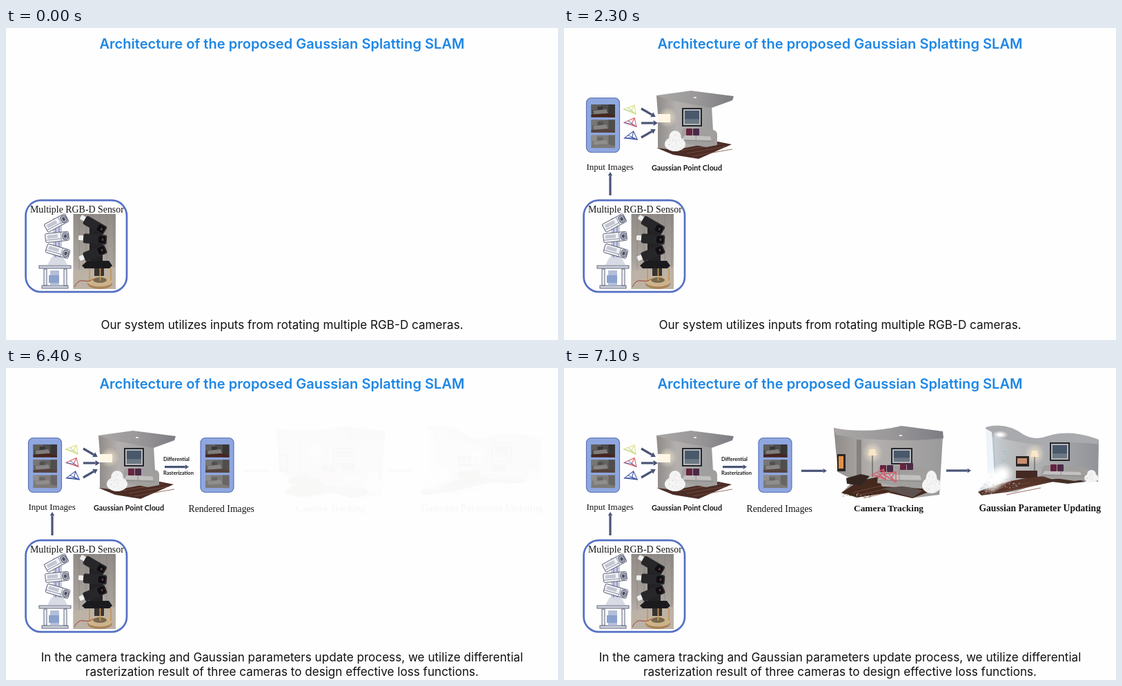
Animation, 800 px wide and 453 px high, one loop 8 s. Source, as an HTML page:

```html
<!DOCTYPE html>
<html lang="en">
<head>
<meta charset="utf-8">
<title>Gaussian Splatting SLAM architecture</title>
<style>
html, body { margin: 0; width: 100%; height: 100%; overflow: hidden; background: #fefefe; }
svg { display: block; width: 100%; height: 100%; }
.sans { font-family: Inter, sans-serif; text-anchor: middle; }
.serif { font-family: "Liberation Serif", serif; fill: #161616; }
.bold { font-weight: 700; }
.label { font-family: Lato, sans-serif; font-weight: 700; fill: #161616; }
.arrow { stroke: #4a5476; fill: #4a5476; }
</style>
</head>
<body>
<svg viewBox="0 0 800 453">
  <defs>
    <linearGradient id="wall">
      <stop offset="0" stop-color="#8f8b89"/><stop offset=".35" stop-color="#b3b0ae"/><stop offset="1" stop-color="#9b9a9b"/>
    </linearGradient>
    <linearGradient id="ceiling">
      <stop offset="0" stop-color="#aaa7a6"/><stop offset=".5" stop-color="#9b999a"/><stop offset="1" stop-color="#7d7c82"/>
    </linearGradient>
    <linearGradient id="pale">
      <stop offset="0" stop-color="#d3dfea"/><stop offset=".25" stop-color="#bdbebf"/><stop offset="1" stop-color="#929398"/>
    </linearGradient>
    <linearGradient id="boards" x2="0" y2="1">
      <stop offset="0" stop-color="#918b87"/><stop offset=".6" stop-color="#a8a19b"/><stop offset="1" stop-color="#cbc1b7"/>
    </linearGradient>
    <radialGradient id="glow"><stop offset=".2" stop-color="#fff"/><stop offset="1" stop-color="#fff" stop-opacity="0"/></radialGradient>
    <radialGradient id="warm"><stop offset="0" stop-color="#fff0d2" stop-opacity=".8"/><stop offset="1" stop-color="#fff0d2" stop-opacity="0"/></radialGradient>
  </defs>
  <rect width="800" height="453" fill="#fefefe"/>
  <text class="sans" x="400" y="29.5" font-size="20.1" font-weight="600" fill="#1e87e5">Architecture of the proposed Gaussian Splatting SLAM</text>
  <g id="sensor"></g>
  <g id="input"></g>
  <g id="cloud"></g>
  <g id="render"></g>
  <g id="update"></g>
  <g class="sans" font-size="17.13" fill="#111">
    <text id="before" x="400" y="437">Our system utilizes inputs from rotating multiple RGB-D cameras.</text>
    <g id="after">
      <text x="400" y="426">In the camera tracking and Gaussian parameters update process, we utilize differential</text>
      <text x="400" y="447">rasterization result of three cameras to design effective loss functions.</text>
    </g>
  </g>
</svg>
<script>
const el = id => document.getElementById(id);
const rect = (x, y, w, h, fill, extra = '') => `<rect x="${x}" y="${y}" width="${w}" height="${h}" fill="${fill}" ${extra}/>`;
const oval = (x, y, rx, ry, fill) => `<ellipse cx="${x}" cy="${y}" rx="${rx}" ry="${ry}" fill="${fill}"/>`;
const shape = (d, fill) => `<path d="${d}Z" fill="${fill}"/>`;
const line = (d, stroke, width = 1) => `<path d="${d}" fill="none" stroke="${stroke}" stroke-width="${width}"/>`;
const text = (x, y, size, words, cls = 'serif') => `<text class="${cls}" x="${x}" y="${y}" font-size="${size}">${words}</text>`;
const at = (x, y, art, turn = 0, scale = 1) => `<g transform="translate(${x} ${y}) rotate(${turn}) scale(${scale})">${art}</g>`;
const repeat = (n, make) => Array.from({ length: n }, (_, i) => make(i)).join('');

function arrow(x, y, length, turn = 0, head = 3.3) {
  const neck = length - head * 1.6;
  return at(x, y, `<g class="arrow"><path d="M0 0H${neck}" stroke-width="3.2"/>
    <path d="M${neck} ${-head}L${length} 0L${neck} ${head}Z" stroke="none"/></g>`, turn);
}

function random(seed) {
  return () => (seed = seed * 16807 % 2147483647) / 2147483647;
}

// Loose points scattered over an ellipse
function specks(x, y, rx, ry, count, ...colors) {
  const next = random(Math.round(x * 31 + y * 7));
  return repeat(count, i => {
    const a = next() * Math.PI * 2, r = Math.sqrt(next());
    return rect((x + Math.cos(a) * r * rx).toFixed(1), (y + Math.sin(a) * r * ry).toFixed(1), 1, 1, colors[i % colors.length]);
  });
}

// Sensor box
const INK = 'stroke="#565a70" stroke-width=".9"';

const sketchLens = rect(-17, -6.5, 34, 13, '#f1f2f6', `rx="2" ${INK}`) + rect(-14, -4, 15, 5, '#c3c6d2')
  + line('M-17 3H6M6 -6V6', '#7b7e92', .8) + rect(8, -5, 8, 10, '#a9acba', `rx="3" ${INK}`) + oval(12, 0, 2, 2.6, '#4a4d60');

const photoLens = rect(-23, -4, 9, 7, '#eeeeec', 'rx="1.5"') + rect(-16, -7, 34, 14, '#27272a', 'rx="3"')
  + rect(6, -5, 10, 10, '#0f0f12', 'rx="2"') + oval(12, 0, 1.5, 2, '#63363c');

const sketch = rect(68, 276, 13, 68, '#c9cce0') + line('M72 276V344M77 276V344', '#7c80b8', 1.2)
  + repeat(3, i => at(73 + i, 283 + 20.5 * i, sketchLens, 22 * i - 28))
  + shape('M60 344L66 333H83L89 344', '#d8dae4')
  + repeat(2, i => rect(48 + 4 * i, 345 + 29 * i, 46 - 8 * i, 4, '#cfd2dd', INK) + rect(55 + 29 * i, 350, 4, 24, '#eceef3', INK))
  + rect(64, 352, 13, 22, '#b4bfd8') + rect(62, 359, 15, 11, '#8ba2cd');

const photo = rect(97.5, 270, 61.5, 109, 'url(#boards)')
  + repeat(6, i => line(`M${106 + i * 10} 270V350`, '#857e7a', .6))
  + shape('M97.5 353L159 347V379H97.5', '#bdb2a6') + rect(121, 287, 19, 56, '#222225')
  + repeat(3, i => at(128, 286 + 20.5 * i, photoLens, 30 - 26 * i))
  + shape('M110 345L118 338H149L154 345L150 349H114', '#1b1b1e') + rect(128, 349, 14, 11, '#39322d')
  + oval(136, 371, 18, 8, '#a98558') + oval(136, 368, 18, 7.5, '#cdb38c') + oval(136, 366, 10, 4, '#77684f')
  + repeat(3, i => line(`M${121 + i * 15.5} 349V367`, '#c19a5b', 1.8))
  + line('M99 376Q104 365 113 367T126 364', '#9b4136');

el('sensor').innerHTML = rect(28.6, 250.2, 146.4, 133, '#fefefe', 'rx="22" stroke="#5570c4" stroke-width="2.7"')
  + sketch + photo + text(35, 268, 13.9, 'Multiple RGB-D Sensor');

// Image panels: three views, each brighter than the one above
function thumb(i) {
  const grey = v => `rgb(${v},${v - 2},${v - 3})`;
  const base = 78 + 24 * i;
  return at(7.5, 10 + 22.3 * i, rect(0, 0, 34.5, 18.5, grey(base)) + rect(0, 0, 14 - 3 * i, 8, grey(base + 18))
    + rect(9, 3, 8, 5, grey(base - 20)) + shape('M3 9L22 7L24 13L4 14', grey(base + 50 - 16 * i))
    + rect(25, 0, 9.5, 18.5, grey(base - 22)) + shape('M0 15L24 13L34.5 16V18.5H0', ['#46251d', '#55433e', '#7d7a78'][i]));
}
const panel = rect(.5, .5, 48, 79, '#8fa6df', 'rx="7" stroke="#5b74b9" stroke-width="1.2"') + repeat(3, thumb);

const frustum = (color, cross) => line('M0 7L15 0L18 13ZM15 0L11 9L18 13', color, 1.1) + line('M0 7L11 9M6 4L18 13', cross);

el('input').innerHTML = at(32, 101, panel)
  + at(87, 111, frustum('#dfe07c', '#b7d6a0'), 4) + at(87, 130.5, frustum('#de5a62', '#5462b0'))
  + at(86, 153, frustum('#3d57a5', '#3d57a5'), -12)
  + text(32.5, 206, 13, 'Input Images') + arrow(67, 243, 34, -90);

// Room parts
const picture = (x, y, w, h) => at(x, y, rect(0, 0, w, h, '#26262b') + rect(2, 2, w - 4, h - 4, '#b4b8bb')
  + rect(4, 4, w - 8, h - 8, '#4a586c') + rect(4, h * .6, w - 8, h * .4 - 4, '#6c7883'));

const sofa = (x, y, w, h) => at(x, y, shape(`M2 4Q4 0 10 0L${w * .8} 2Q${w} 3 ${w} 9V${h}L${w * .7} ${h + 3}L0 ${h - 4}`, '#a19f9e')
  + shape(`M6 ${h * .43}L${w * .82} ${h * .5}L${w * .84} ${h * .72}L2 ${h * .68}`, '#c2c1bf')
  + line(`M${w * .42} 2V${h * .7}M3 ${h * .72}L${w * .9} ${h * .8}`, '#858383', .8));

const cushions = (x, y) => rect(x, y, 9, 10, '#67233f', 'rx="1"') + rect(x + 10, y, 9, 10, '#4b2948', 'rx="1"');

const lamp = (x, y, foot) => oval(x, y, 15, 16, 'url(#warm)') + line(`M${x} ${y}V${foot}`, '#514844')
  + shape(`M${x - 4} ${y - 5}h8l2 9h-12`, '#f8e6c6');

const screen = (x, y, w, h, glow) => rect(x, y, w, h, '#2c2625') + rect(x + 2, y + 3, w - 5, h - 7, glow);

const mound = (x, y, w, h) => at(x, y, oval(w * .5, h * .35, w * .3, h * .35, '#f4f4f4') + oval(w * .5, h * .65, w * .5, h * .35, '#f4f4f4')
  + specks(w / 2, h * .55, w * .45, h * .4, 40, '#c4c4c5', '#fff', '#dadada'));

const planks = (x, y, w) => repeat(3, i => line(`M${x + i * 8} ${y + i * 4}l${w} -10`, '#7b5041', .8));

el('cloud').innerHTML = shape('M134 98L186 107L214 113L217 166L160 180L136 174V137H154V125H136', 'url(#wall)')
  + shape('M133 98L184 91L246 99L244 105L214 116L160 106', 'url(#ceiling)') + oval(190, 101, 2.2, 1, '#f6f1e6')
  + oval(150, 130, 14, 15, 'url(#warm)') + rect(136, 126, 13, 10, '#fff6e6') + picture(171, 116, 29, 27)
  + shape('M134 174L160 177L223 165L243 169L195 190L158 184', '#4c2d26') + planks(170, 178, 58)
  + sofa(169, 145, 53, 25) + cushions(177, 146) + mound(146, 149, 30, 30)
  + repeat(3, i => arrow(112, 117 + 21 * i, 24, 30 - 30 * i, 4))
  + text(127, 207, 10.8, 'Gaussian Point Cloud', 'label');

el('render').innerHTML = at(281.5, 101, panel)
  + text(228, 135, 7.5, 'Differential', 'label') + text(228, 155, 7.5, 'Rasterization', 'label')
  + arrow(230, 143.6, 35) + text(264.5, 209, 13.7, 'Rendered Images');

const tracking = shape('M391 87L440 99L549 100L544 184L505 189L460 178L425 188L402 182L420 163L397 151', 'url(#wall)')
  + shape('M391 87Q440 96 489 84L549 92L550 102Q470 110 394 97', 'url(#ceiling)') + oval(488, 98, 2.5, 1, '#f6f1e6')
  + rect(424, 104, 7, 58, '#85817f') + lamp(447, 123, 158) + picture(474, 116, 31, 24) + screen(396, 125, 12, 25, '#e39048')
  + shape('M402 181L428 164L455 158L461 172L539 176L505 189L470 181L425 188', '#45291f') + planks(418, 181, 42)
  + shape('M409 160L430 154L443 157L430 171L410 168', '#352520') + shape('M461 175L494 171L520 178L505 188', '#5d524e')
  + sofa(454, 141, 76, 30) + cushions(458, 141) + cushions(487, 138) + mound(519, 149, 27, 33)
  + repeat(2, i => at(446 + 18 * i, 147, frustum('#de5963', '#c9687e'), 12 * i, 1.15))
  + specks(425, 185, 24, 4, 28, '#45291f', '#fefefe');

const updating = shape('M611 87L684 106L735 99L775 105L774 165L700 162L655 180L604 184L600 179L621 152', 'url(#pale)')
  + shape('M611 86Q640 78 665 96Q682 106 700 99Q735 88 775 104V111Q738 105 684 112Q650 106 614 98', '#a9aaad')
  + oval(632, 97, 12, 6, 'url(#glow)') + shape('M611 88L620 93L624 158L614 153', '#edf4f9') + line('M622 96L625 164', '#aebdcb', 1.3)
  + picture(704, 108, 29, 27) + lamp(682, 125, 151) + screen(655, 128, 19, 15, '#c78f72')
  + rect(655, 149, 31, 11, '#432922') + shape('M600 180Q640 162 694 157L714 164L642 180L605 185', '#573429') + planks(625, 176, 50)
  + repeat(3, i => oval(618 + 9 * i, 166 - 6 * i, 17, 17, 'url(#glow)'))
  + shape('M690 163L733 159L757 165L730 168', '#453029') + sofa(691, 141, 70, 20) + cushions(705, 140) + mound(754, 148, 21, 18)
  + specks(638, 126, 10, 10, 20, '#62b9e8', '#a5daf1') + specks(646, 167, 14, 7, 22, '#d76a62', '#70b8da', '#fff')
  + specks(613, 174, 12, 10, 36, '#fefefe', '#d9dee2', '#a99c95');

el('update').innerHTML = tracking + updating + arrow(344, 149.3, 37) + arrow(554, 149, 36)
  + text(420, 208, 13.4, 'Camera Tracking', 'serif bold') + text(601.5, 208, 13.6, 'Gaussian Parameter Updating', 'serif bold');

const LOOP = 8000, STEP = 100, FADE = 460, SWAP = 6400;
const starts = { input: 350, cloud: 1790, render: 3350, update: 6390 };

function draw(time) {
  const t = Math.floor(time % LOOP / STEP) * STEP;
  for (const id in starts) {
    el(id).setAttribute('opacity', Math.max(0, Math.min(1, (t - starts[id]) / FADE)));
  }
  el('before').setAttribute('visibility', t < SWAP ? 'visible' : 'hidden');
  el('after').setAttribute('visibility', t < SWAP ? 'hidden' : 'visible');
}

function tick() {
  draw(performance.now());
  requestAnimationFrame(tick);
}
tick();
</script>
</body>
</html>
```
